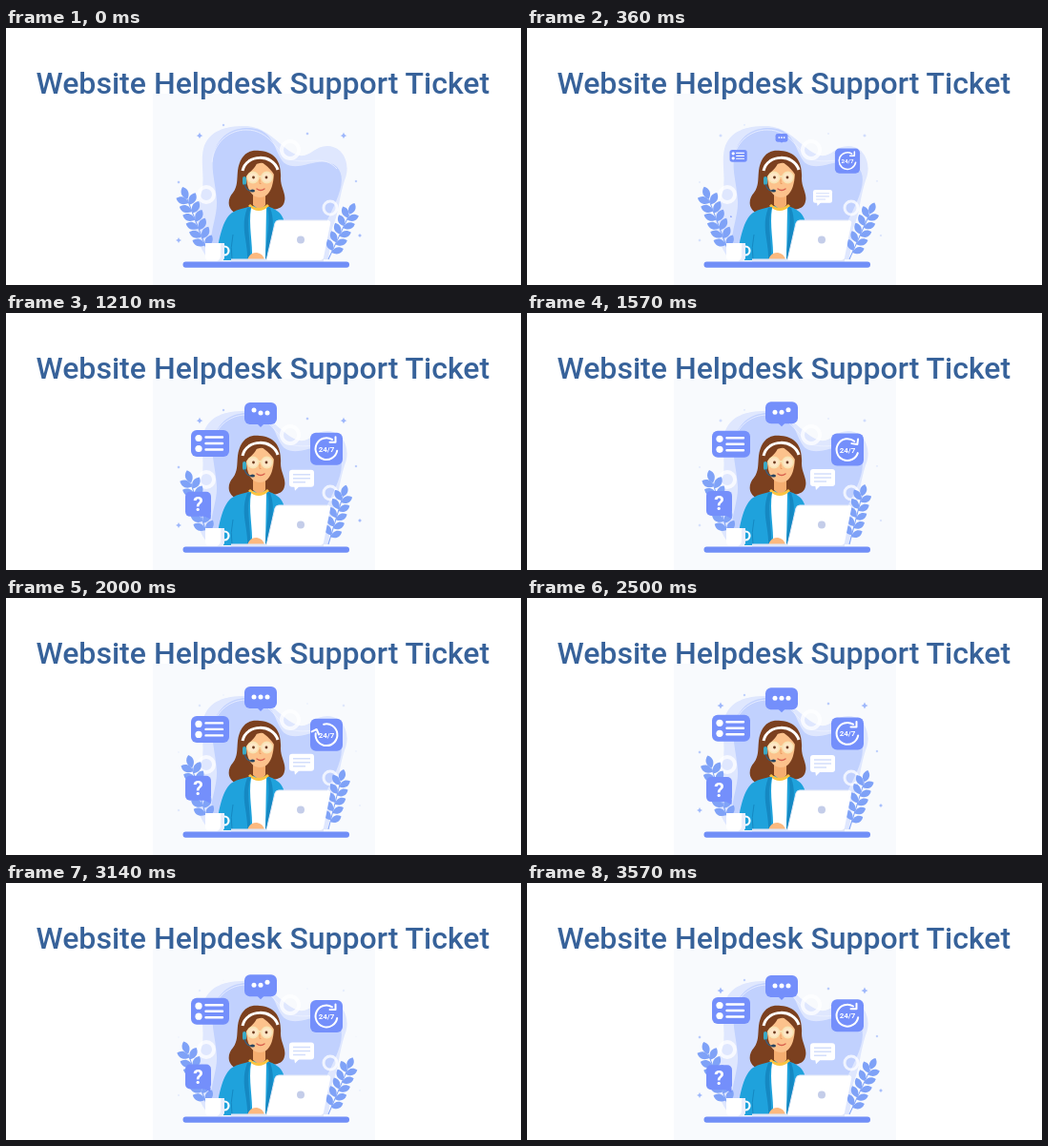
Write an HTML page that moves like this. It is 540 by 270 pixels and loops after 3.64 s.

```html
<!DOCTYPE html>
<html lang="en">
<head>
<meta charset="utf-8">
<title>Website Helpdesk Support Ticket</title>
<style>
  html, body { margin: 0; width: 100%; height: 100%; overflow: hidden; background: #fff; }
  svg { display: block; width: 540px; height: 270px; }
  .title { font: 500 32px Roboto, sans-serif; fill: #37629a; }
  .clock { font: 700 8px Roboto, sans-serif; fill: #fff; text-anchor: middle; }
  .ask { font: 700 21px Roboto, sans-serif; fill: #fff; text-anchor: middle; }
  .icon { fill: #748ffb; }
  .line { fill: none; stroke: #fff; stroke-linecap: round; }
</style>
</head>
<body>
<svg viewBox="0 0 540 270">
  <rect x="154" y="69" width="233" height="201" fill="#f8fafd"/>
  <text class="title" x="31.5" y="69">Website Helpdesk Support Ticket</text>

  <!-- backdrop -->
  <path fill="#dfe7fe" d="M212 243C198 224 193 200 202 182C211 164 203 144 207 127C212 108 230 103 250 103C274 103 284 122 302 132C318 140 322 123 338 124C354 125 362 143 355 160C349 178 349 196 342 210L338 243Z"/>
  <path fill="#c1d1fe" d="M221 243C207 226 222 202 221 182C220 162 213 146 219 128C226 109 243 104 256 105C283 107 281 132 292 142C308 153 330 131 347 146C360 160 344 186 335 206L326 243Z"/>
  <path fill="none" stroke="#eef2ff" stroke-width=".8" d="M216 141C218 120 234 107 252 107C277 107 283 130 299 138C316 144 333 132 347 148"/>
  <g fill="none" stroke="#fff" stroke-opacity=".75">
    <circle cx="298" cy="128" r="9" stroke-width="4"/>
    <circle cx="340" cy="189" r="7" stroke-width="3"/>
    <circle cx="210" cy="175" r="8" stroke-width="4"/>
  </g>
  <g id="sparks" fill="#9db6fb"></g>
  <g id="plants" fill="#7fa2f7" stroke="#7fa2f7"></g>

  <!-- agent -->
  <path fill="#7b401f" d="M266 129C252 127 245 136 243 150C242 160 243 166 238 173C231 181 233 190 240 194C247 197 255 193 258 190L276 190C283 192 291 189 292 182C294 174 288 168 288 158C289 142 283 130 266 129Z"/>
  <path fill="#1fa2dc" d="M220 244C223 222 227 201 237 194C244 190 252 189 258 187L274 187C282 190 288 193 291 201L296 244Z"/>
  <path fill="#fff" d="M257 189L273 189L272 244H258C259 226 254 207 257 189Z"/>
  <path fill="#f5ad70" d="M259 173H272V186Q266 193 259 186Z"/>
  <path fill="none" stroke="#fbc443" stroke-width="3" d="M255 186Q265 195 275 186"/>
  <path fill="#1588c2" d="M257 188C251 205 257 224 256 244H253C254 225 245 210 253 189ZM274 188C278 206 272 224 272 244H275C276 226 284 207 277 189Z"/>
  <path fill="none" stroke="#1588c2" d="M238 217Q235 231 237 243"/>
  <path fill="#fcc28c" d="M252 149C251 166 256 178 266 178C277 178 281 165 281 149C277 142 272 141 266 142Q256 144 252 149Z"/>
  <path fill="#7b401f" d="M264 139C262 148 256 150 251 157L248 147Q252 136 264 139ZM264 139C271 142 278 148 283 157L284 145Q276 134 264 139Z"/>
  <path fill="none" stroke="#fff" stroke-width="3" d="M248 150C252 132 280 132 285 149"/>
  <g fill="#fff6df" fill-opacity=".7" stroke="#f7e4b4" stroke-width="1.6">
    <circle cx="259" cy="157" r="5.6"/><circle cx="273.500" cy="157" r="5.6"/>
    <path fill="none" d="M264.600 156h3.300"/>
  </g>
  <g fill="#6b3a1e"><circle cx="259.500" cy="157" r="1.400"/><circle cx="273" cy="157" r="1.400"/></g>
  <path fill="none" stroke="#eb9c60" d="M266 159v4.500h1.500"/>
  <path fill="none" stroke="#d8604e" stroke-width="1.400" stroke-linecap="round" d="M263 169Q267 172 271 169"/>
  <rect x="248" y="156" width="4" height="9" rx="2" fill="#3ba9c4"/>
  <path fill="none" stroke="#365d7c" stroke-width="1.200" d="M250 164Q252 171 257 171"/>
  <ellipse cx="258.500" cy="171" rx="2.500" ry="1.600" fill="#29455f"/>
  <path fill="#fcb97f" d="M253 244Q255 236 263 236Q270 237 271 244Z"/>

  <!-- desk -->
  <path fill="#e1e7f8" d="M236 242.500H333V245.500H236Z"/>
  <path fill="#fff" d="M286 202H337Q341 202 340 206L333 241Q332.500 244 329 244H273L282 205Q283 202 286 202Z"/>
  <path fill="none" stroke="#e3e8f7" d="M273 244L282 205Q283 202 286 202H337"/>
  <circle cx="309" cy="222.500" r="4" fill="#c4cde9"/>
  <circle cx="229" cy="234" r="4.500" fill="none" stroke="#fff" stroke-width="2.200"/>
  <path fill="#fff" d="M209 226H229V240Q229 245 224 245H214Q209 245 209 240Z"/>
  <path fill="#e9eefb" d="M225 226H229V240Q229 245 224 245H221Q225 243 225 239Z"/>
  <rect x="185.500" y="245.500" width="174.500" height="6.300" rx="3" fill="#708ef7"/>

  <!-- bubbles -->
  <g id="list">
    <rect class="icon" x="-20" y="-14" width="40" height="28" rx="6"/>
    <g fill="#fff"><circle cx="-12" cy="-5.500" r="3.600"/><circle cx="-12" cy="5.500" r="3.600"/></g>
    <path class="line" stroke-width="2.400" d="M-4.500 -6.500H13M-4.500 0H13M-4.500 6.500H13"/>
  </g>
  <g id="chat">
    <path class="icon" d="M-6 9H6L0 15Z"/>
    <rect class="icon" x="-17" y="-11" width="34" height="23" rx="6"/>
    <g id="dots" fill="#fff"><circle cx="-7" r="2.500"/><circle r="2.500"/><circle cx="7" r="2.500"/></g>
  </g>
  <g id="hours">
    <rect class="icon" x="-17" y="-17" width="34" height="34" rx="6"/>
    <g id="arrow">
      <path class="line" stroke-width="2" d="M11.200 2A11.400 11.400 0 1 1 6 -9.700"/>
      <path class="line" stroke-width="2" stroke-linejoin="round" d="M9.500 -12.500V-7H3.500"/>
    </g>
    <text class="clock" y="3">24/7</text>
  </g>
  <g id="note">
    <path fill="#fff" d="M-8 7H-1L-7 13Z"/>
    <rect x="-13" y="-9" width="26" height="18" rx="3" fill="#fff"/>
    <path fill="none" stroke="#d3defb" stroke-width="1.500" d="M-9 -4H9M-9 0H9M-9 4H4"/>
  </g>
  <g id="help">
    <path class="icon" d="M3 11H13V16Z"/>
    <rect class="icon" x="-13.500" y="-13" width="27" height="26" rx="5"/>
    <text class="ask" y="7.500">?</text>
  </g>
</svg>
<script>
const LOOP = 3640, STEPS = 51;
const $ = id => document.getElementById(id);
const clamp = v => Math.max(0, Math.min(1, v));
const place = (el, value) => el.setAttribute('transform', value);

function add(parent, tag, attrs) {
  const el = document.createElementNS('http://www.w3.org/2000/svg', tag);
  for (const key in attrs) el.setAttribute(key, attrs[key]);
  return parent.appendChild(el);
}

// x, y, size
const sparks = [[203, 113, 3.6], [354, 113, 3.6], [181, 223, 3], [371, 218, 2.2],
  [316, 111, 1.8], [181, 162, 1.8], [228, 102, 1.5], [367, 161, 1.5]]
  .map(([x, y, size]) => ({ x, y, size,
    el: add($('sparks'), 'path', { d: 'M0-1Q.15-.15 1 0Q.15 .15 0 1Q-.15 .15-1 0Q-.15-.15 0-1Z' }) }));

function plant(x, y, height, leaf, lean, sway) {
  const el = add($('plants'), 'g', {});
  add(el, 'path', { d: `M0 0V${-height + leaf}`, fill: 'none' });
  const blade = (at, turn) => add(el, 'path', {
    d: `M0 0C${-leaf / 2.6} ${-leaf * .35} ${-leaf / 3} ${-leaf * .75} 0 ${-leaf}` +
       `C${leaf / 3} ${-leaf * .75} ${leaf / 2.6} ${-leaf * .35} 0 0Z`,
    stroke: 'none', transform: `translate(0 ${at}) rotate(${turn})`
  });
  const top = -height + leaf;
  for (let at = top + 4; at < -8; at += 9.5) {
    blade(at, -48);
    blade(at + 2, 48);
  }
  blade(top, 0);
  return { el, x, y, lean, sway };
}
const plants = [plant(212, 237, 75, 14, -18.5, -2.5), plant(338, 243, 65, 13, 19.5, 5.5)];

// x, y, bob, pop start, pop length, anchor x, anchor y
const bubbles = [
  ['list', 214, 136, -2, 200, 600, 14, 0],
  ['chat', 267, 106, 2, 230, 600, 0, 12],
  ['hours', 336, 141.5, -2.3, 60, 570, 0, 0],
  ['note', 310, 175, 2.3, 60, 570, 0, 0],
  ['help', 201.5, 202, 2.3, 340, 600, 13, -6]
];

function draw(t) {
  const wave = Math.cos(t / LOOP * 2 * Math.PI);
  const glint = .5 + .5 * Math.cos(t / LOOP * 6 * Math.PI);

  for (const s of sparks) {
    place(s.el, `translate(${s.x} ${s.y}) scale(${s.size * (.35 + .65 * glint)})`);
    s.el.setAttribute('opacity', .25 + .75 * glint);
  }
  for (const p of plants)
    place(p.el, `translate(${p.x} ${p.y}) rotate(${p.lean + p.sway * wave})`);

  for (const [id, x, y, bob, start, length, ax, ay] of bubbles) {
    const scale = 1 - (1 - clamp((t - start) / length)) ** 2;
    place($(id), `translate(${x + ax} ${y + bob * wave + ay}) scale(${scale}) translate(${-ax} ${-ay})`);
  }

  [...$('dots').children].forEach((dot, i) => {
    const hop = start => Math.sin(Math.PI * clamp((t - start - i * 150) / 300));
    dot.setAttribute('cy', -3 * (hop(1060) + hop(2690)));
  });

  const turn = clamp((t - 1500) / 800);
  place($('arrow'), `rotate(${360 * turn * turn * (3 - 2 * turn)})`);
}

const begin = performance.now();
function tick(now) {
  const t = Math.max(0, now - begin) % LOOP;
  const step = Math.min(STEPS - 1, Math.floor(t / LOOP * STEPS + .1));
  draw(step * LOOP / STEPS);
  requestAnimationFrame(tick);
}
draw(0);
requestAnimationFrame(tick);
</script>
</body>
</html>
```
